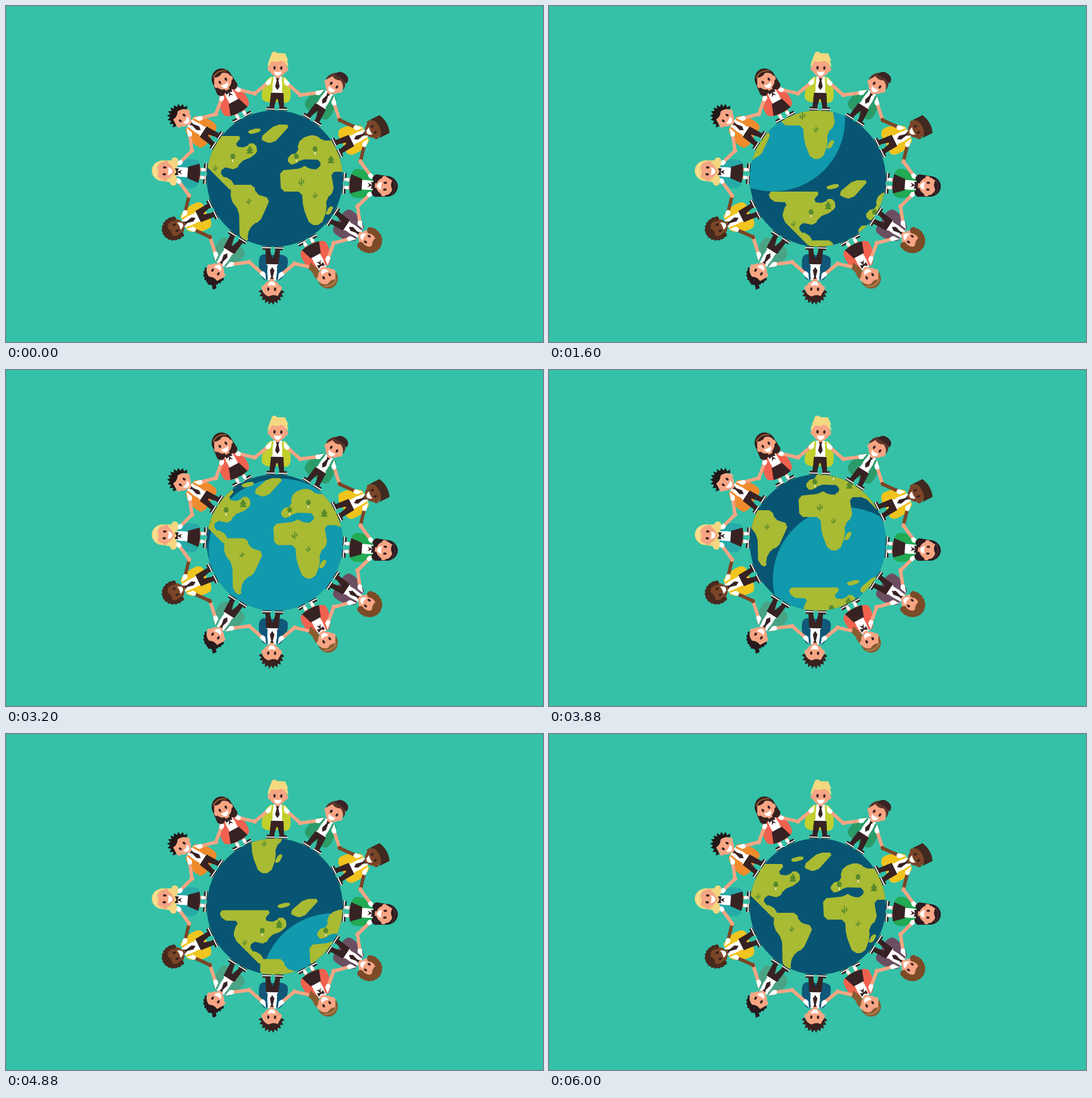
Recreate the animation shown at these times as an HTML page. Size 947 by 592 pixels, loop 6040 ms.

```html
<!DOCTYPE html>
<html>
<head>
<meta charset="utf-8">
<style>
html, body { margin: 0; width: 100%; height: 100%; overflow: hidden; background: #34c1a7; }
svg { display: block; width: 947px; height: 592px; }
</style>
</head>
<body>
<svg id="stage" viewBox="0 0 947 592"></svg>
<script>
const LOOP = 6040, STEP = 40, CX = 474, CY = 304, R = 120, REACH = 154;
const DARK = '#372223', LIGHT = '#f7a583', BROWN = '#7b4527', LEAF = '#568a2c';

const path = (d, fill) => `<path d="${d}" fill="${fill}"/>`;
const line = (d, color, width) =>
  `<path d="${d}" fill="none" stroke="${color}" stroke-width="${width}" stroke-linecap="round" stroke-linejoin="round"/>`;
const oval = (x, y, rx, ry, fill) => `<ellipse cx="${x}" cy="${y}" rx="${rx}" ry="${ry}" fill="${fill}"/>`;
const box = (x, y, w, h, fill) => `<rect x="${x}" y="${y}" width="${w}" height="${h}" fill="${fill}"/>`;
const range = (n, f) => Array.from({ length: n }, (_, i) => f(i));

// ---- world map: rough corners, each one cut off at a slant ----
function coast(corners) {
  const pts = corners.split(',').map(p => p.trim().split(' ').map(Number));
  const toward = ([x, y], [u, v]) => {
    const len = Math.hypot(u - x, v - y), k = Math.min(6, len * .35) / len;
    return [x + (u - x) * k, y + (v - y) * k].join(' ');
  };
  const cut = pts.map((p, i) =>
    toward(p, pts.at(i - 1)) + ' ' + toward(p, pts[(i + 1) % pts.length]));
  return path(`M${cut.join('L')}Z`, '#a9ba33');
}

const northAmerica = coast('323 229,417 229,402 247,424 250,432 238,446 251,437 265,413 274,407 289,381 283,378 301,394 302,405 319,398 327,350 279,350 262,360 248,330 247');
const southAmerica = coast('397 315,438 315,440 331,466 339,457 360,447 381,436 383,425 402,428 417,412 409,411 361,396 341');
const greenland = coast('448 232,475 209,502 209,472 242,456 240') + coast('423 224,434 216,454 216,440 226');
const africa = coast('483 290,521 286,527 280,533 287,553 288,556 271,520 270,511 279,497 279,497 263,517 258,513 242,530 228,550 228,556 237,605 237,640 300,625 318,600 292,573 292,579 327,564 340,566 359,556 386,536 386,524 355,522 327,485 327');
const madagascar = coast('565 371,564 361,576 349,577 361');

const cactus = (x, y, s) => `<g transform="translate(${x} ${y}) scale(${s})">` +
  line('M0 6V-6M0 3H-4V-1M0 1H4V-3', LEAF, 1.8) + '</g>';
const tree = (x, y) => line(`M${x} ${y}v7`, '#f3efd8', 1.8) + oval(x, y - 2, 4.2, 5, LEAF);
const pine = (x, y) => path(`M${x} ${y - 8}l6 9h-3l3 5h-12l3-5h-3z`, LEAF);

const map = northAmerica + southAmerica + greenland + africa + madagascar +
  cactus(369, 286, .8) + cactus(428, 344, .8) + cactus(521, 310, 1) + cactus(545, 334, .8) +
  tree(400, 267) + tree(512, 267) + tree(545, 254) + pine(430, 254) + pine(573, 271);

// ---- hair: the head is centred on 0,-76 with the feet at 0,0 ----
const onHead = (turn, r) => [r * Math.cos(turn * Math.PI), -78 - r * 1.08 * Math.sin(turn * Math.PI)];

// Hair over the top of the head, smooth or with spikes of the given length
function crown(color, spike = 0) {
  const rim = range(21, i => onHead(1.03 - i * .053, 18 + (i % 2 ? spike : 0)).join(' '));
  return path(`M${rim.join('L')}Q13-86 5-88Q-3-83-11-87Q-13-82-18-75Z`, color);
}
const curls = (color, size) => crown(color) + range(13, i => {
  const [x, y] = onHead(1.12 - i * .1033, 17);
  return oval(x, y, size, size, color);
}).join('');
const shine = color => line('M-12-88Q0-97 13-88', color, 2);
const curtain = color => path('M-18-80C-17-100 17-100 18-80L20-58Q14-48 8-54H-8Q-14-48-20-58Z', color);

const quiff = c => ['', crown(c) + path('M-16-88-11-102-6-104-2-101 12-101 18-88Z', c)];
const capped = c => ['', crown(c) + path('M-9-91Q-7-103 5-102Q18-101 17-89Q5-94-9-91Z', '#3a2324')];
const flatTop = c => ['', crown(c) + path('M-18-80-18-95Q0-104 18-97V-80Q0-92-18-80Z', c)];
const long = (c, band) => [curtain(c), crown(c) + shine(band)];
const curly = (c, size) => ['', curls(c, size)];
const sideTail = (c, band) => [path('M10-84Q22-72 19-58L22-48 14-40 10-50 7-58Z', c), crown(c) + shine(band)];
const spiky = c => ['', crown(c, 5)];
const bun = c => [path('M-10-91-17-98-13-104-7-98 0-101 4-91Z', c), crown(c, 2)];
const wavy = (c, band) => [curtain(c) + oval(-19, -58, 6, 6, c) + oval(19, -58, 6, 6, c), crown(c) + shine(band)];

const boy = (skin, bag, hair) => ({ skin, bag, hair });
const girl = (bag, hair) => ({ skin: LIGHT, bag, hair, skirt: true });
const kids = [
  boy(LIGHT, '#c2cf2d', quiff('#f4d980')),
  boy(LIGHT, '#2b9c69', capped('#59352a')),
  boy(BROWN, '#f1c31d', flatTop('#40291f')),
  girl('#22aa54', long('#2d1c20', '#463035')),
  boy(LIGHT, '#6c4e61', curly('#7c4b27', 6)),
  girl('#f0624e', sideTail('#8b5c31', '#ae854e')),
  boy(LIGHT, '#10587a', spiky('#38211f')),
  boy(LIGHT, '#49a485', bun('#271a1e')),
  boy(BROWN, '#f1c520', curly('#48291d', 4)),
  girl('#27aaa8', wavy('#f4d780', '#fbe9ab')),
  boy(LIGHT, '#ef8b2d', spiky('#231617')),
  girl('#f0624e', long('#38211f', '#9a5d32'))
];

// Nearly even spacing round the globe, in degrees
const angleOf = i => 2.8 + 30 * i - 1.2 * Math.cos((i + .2) * Math.PI / 3);

// Side 1 reaches for the next kid, side -1 for the one before
function arm(i, side, skin) {
  const half = (angleOf(i + side) - angleOf(i)) / 2 * Math.PI / 180;
  const x = REACH * Math.sin(half), y = R - REACH * Math.cos(half);
  return line(`M${side * 12}-53Q${side * 25}-41 ${x} ${y}`, skin, 6) + oval(x, y, 4, 3.6, skin) +
    line(`M${side * 10}-54L${side * 17}-48`, '#fff', 8);
}

const shoe = x => box(x, -6, 14, 3.4, DARK) + box(x - 1, -3, 16, 2, '#fff') + box(x - 1, -1.2, 16, 1.4, DARK);

const face = skin => oval(-15, -73, 3, 4, skin) + oval(15, -73, 3, 4, skin) + oval(0, -76, 15.5, 16.5, skin);
const features = oval(-6, -75, 2, 3.1, DARK) + oval(6, -75, 2, 3.1, DARK) +
  path('M-7-69Q0-67 7-69Q5-61 0-61Q-5-61-7-69Z', '#fff');

const trousers = path('M-11-31H11L13-5H5L1-20H-1L-5-5H-13Z', DARK) +
  path('M-3-57H3L1.5-53 4-42 0-36-4-42-1.5-53Z', DARK);
const skirt = skin => line('M-7-17V-8M7-17V-8', skin, 6) + line('M-7-8V-6M7-8V-6', '#fff', 6) +
  path('M-10-34H10L17-14Q0-10-17-14Z', DARK) +
  path('M0-54-6-57V-50L0-52 6-50V-57ZM0-53-4-44 0-47 4-44Z', DARK);

function drawKid({ skin, bag, hair: [back, front], skirt: wearsSkirt }, i) {
  return `<g transform="translate(${CX} ${CY}) rotate(${angleOf(i)}) translate(0 ${-R})">` +
    path('M-13-59C-23-52-30-30-26-19Q-18-11-4-15H8Q19-11 23-20C26-34 21-54 13-59Z', bag) +
    arm(i, 1, skin) + arm(i, -1, skin) + shoe(-18) + shoe(4) +
    path('M-12-58Q0-62 12-58L10-30H-10Z', '#fff') +
    line('M-9-57Q-11-45-10-34M9-57Q11-45 10-34', bag, 3.4) +
    back + box(-4, -64, 8, 7, skin) + (wearsSkirt ? skirt(skin) : trousers) +
    face(skin) + front + features + '</g>';
}

const stage = document.getElementById('stage');
stage.innerHTML =
  `<clipPath id="disc"><circle cx="${CX}" cy="${CY}" r="${R}"/></clipPath>` +
  `<g clip-path="url(#disc)">${box(CX - R, CY - R, 2 * R, 2 * R, '#075572')}` +
  '<circle id="glow" r="127" fill="#1199ad"/>' +
  `<g class="map">${map}</g>`.repeat(3) + '</g>' +
  kids.map(drawKid).join('');

const glow = document.getElementById('glow');
const maps = [...document.querySelectorAll('.map')];
const centred = [0, 2945, 6000]; // when each map copy is in its home place

function draw(now) {
  const t = Math.min(Math.floor(now % LOOP / STEP) * STEP, 6000);
  glow.setAttribute('cx', CX + (t - 3020) * .0555);
  glow.setAttribute('cy', CY + 1 + (t - 3020) * .0741);
  maps.forEach((m, i) => {
    const d = centred[i] - t;
    m.setAttribute('transform', `translate(${d * .0463} ${d * .0728})`);
  });
}

const start = performance.now();
function frame() {
  draw(performance.now() - start);
  requestAnimationFrame(frame);
}
frame();
</script>
</body>
</html>
```
